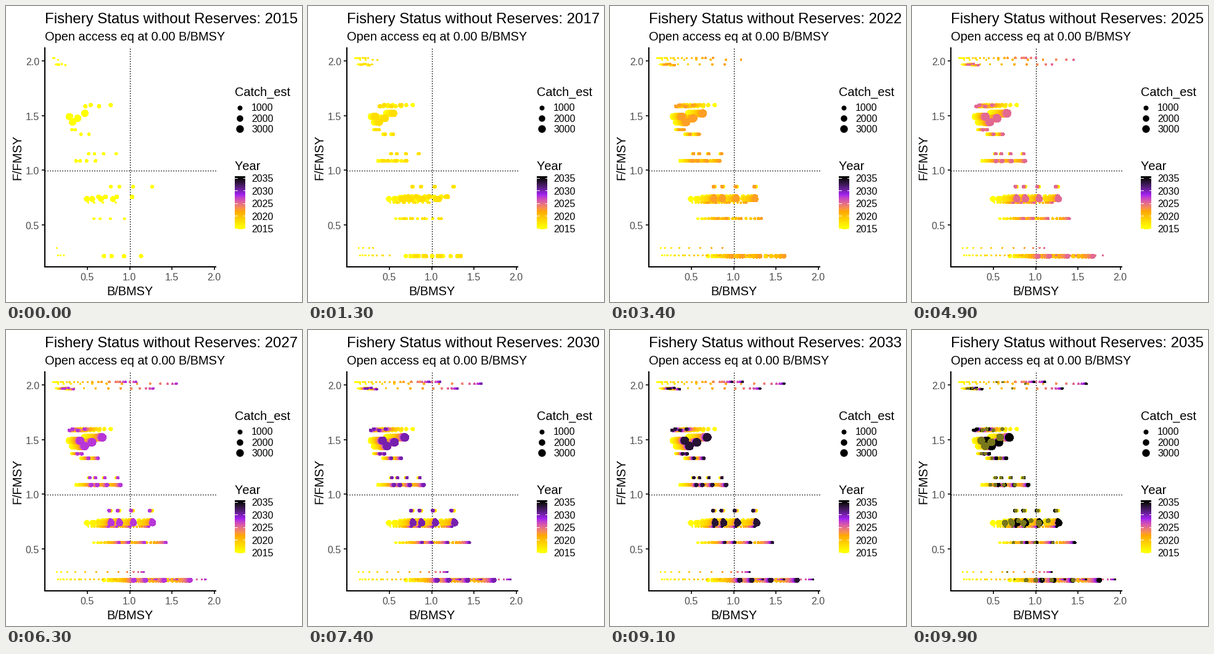
These frames come from a looping animation (480 px wide and 480 px high, 10000 ms). A matplotlib script:

```python
import matplotlib.pyplot as plt
import numpy as np
from matplotlib.animation import FuncAnimation

SIZE, DPI = 480, 72
FIRST, LAST = 2015, 2035
YEARS = np.arange(FIRST, LAST + 1)
# frames that show a halfway step: every fifth, then every fourth
STEPS = [*range(3, 84, 5), *range(87, 100, 4)]

plt.rcParams.update({"font.family": "Liberation Sans",
                     "text.kerning_factor": 6})


# ---- colour scale, blended in CIE Lab ----
RGB_XYZ = np.array([[0.4124, 0.3576, 0.1805],
                    [0.2126, 0.7152, 0.0722],
                    [0.0193, 0.1192, 0.9505]])
WHITE = RGB_XYZ.sum(axis=1)


def to_lab(rgb):
    rgb = np.asarray(rgb) / 255
    lin = np.where(rgb > 0.04045, ((rgb + 0.055) / 1.055) ** 2.4, rgb / 12.92)
    t = lin @ RGB_XYZ.T / WHITE
    f = np.where(t > 0.008856, np.cbrt(t), 7.787 * t + 16 / 116)
    x, y, z = np.moveaxis(f, -1, 0)
    return np.stack([116 * y - 16, 500 * (x - y), 200 * (y - z)], axis=-1)


def to_rgb(lab):
    light, a, b = np.moveaxis(lab, -1, 0)
    y = (light + 16) / 116
    f = np.stack([y + a / 500, y, y - b / 200], axis=-1)
    xyz = np.where(f > 0.2069, f ** 3, (f - 16 / 116) / 7.787) * WHITE
    lin = np.clip(xyz @ np.linalg.inv(RGB_XYZ).T, 0, 1)
    rgb = np.where(lin > 0.0031308, 1.055 * lin ** (1 / 2.4) - 0.055, 12.92 * lin)
    return np.clip(rgb, 0, 1)


# yellow, orange, purple, black
STOPS = to_lab([(255, 255, 0), (255, 165, 0), (160, 32, 240), (0, 0, 0)])


def year_lab(year):
    at = np.linspace(FIRST, LAST, len(STOPS))
    return np.stack([np.interp(year, at, ch) for ch in STOPS.T], axis=-1)


# ---- fish stocks: each has four runs that share one growth curve ----
RUNS = np.array([1, 1.13, 1.34, 1.63])
SHAPE = 1.5
MIN_R = 0.9

# growth rate: [(F, first B, limit of B, dot radius), ...] for the lowest run
STOCKS = {
    0.12: [((1.967, 1.967, 1.972, 1.962), 0.147, 0.24, 1.6),
           ((1.585, 1.596), 0.475, 0.258, 2.4),
           ((1.37, 1.37, 1.329, 1.329), 0.317, 0.412, 2.4),
           (0.85, 0.775, 0.75, 2.5)],
    0.25: [((1.49, 1.44, 1.475, 1.52), 0.287, 0.424, 6.4),
           (1.15, 0.515, 0.528, 2.3),
           (1.085, 0.365, 0.562, 2.9),
           (0.705, 0.51, 0.77, 1.6),
           (0.557, 0.575, 0.9, 2.1),
           (0.214, 0.695, 1.08, 3.6)],
    0.53: [((2.026, 2.026, 1.968, 2.01), 0.095, 0.98, 1.6),
           (0.757, 0.63, 0.775, 3.6),
           (0.737, 0.492, 0.78, 5.1),
           ((0.29, 0.222, 0.222, 0.222), 0.135, 1.19, 1.2)],
}


def px(b):
    return 63.5 + 137.3 * b


def py(f):
    return 443.6 - 177.3 * f


def simulate():
    """Positions and radii, indexed by year then dot."""
    t = (YEARS - FIRST)[:, None]
    pos, rad = [], []
    for rate, group in STOCKS.items():
        for f, start, limit, radius in group:
            gap = (limit / start) ** SHAPE - 1
            level = (1 + gap * np.exp(-rate * t)) ** (-1 / SHAPE)
            x = px(level * limit * RUNS)
            y = np.broadcast_to(py(np.resize(f, len(RUNS))), x.shape)
            r = MIN_R + (radius - MIN_R) * np.sqrt(level)
            pos.append(np.stack([x, y], axis=-1))
            rad.append(np.broadcast_to(r, x.shape))
    return np.hstack(pos), np.hstack(rad)


POS, RAD = simulate()
LAB = np.repeat(year_lab(YEARS)[:, None], RAD.shape[1], axis=1)


# ---- static plot ----
fig = plt.figure(figsize=(SIZE / DPI, SIZE / DPI), dpi=DPI, facecolor="white")
ax = fig.add_axes([0, 0, 1, 1])

bar = to_rgb(year_lab(np.linspace(LAST + 0.6, FIRST - 0.6, 86)))
ax.imshow(bar[:, None], extent=(371, 388, 362, 276), aspect="auto", zorder=1)
ax.set(xlim=(0, SIZE), ylim=(SIZE, 0))
ax.axis("off")


def line(x, y, color="black", lw=2, **kw):
    ax.plot(x, y, color=color, lw=lw, antialiased=False,
            solid_capstyle="butt", dash_capstyle="butt", **kw)


def text(x, y, s, size, color="black", **kw):
    kw.setdefault("va", "baseline")
    return ax.text(x, y, s, fontsize=size, color=color, **kw)


GREY, TICK = "#4d4d4d", "#333333"
DOTTED = dict(lw=1, ls=(0, (1, 2)), zorder=2)
line([200.5, 200.5], [69, 422], **DOTTED)
line([63, 341], [266.5, 266.5], **DOTTED)
for v in (0.5, 1.0, 1.5, 2.0):
    line([px(v)] * 2, [423, 428], TICK)
    line([58, 63], [py(v)] * 2, TICK)
    text(px(v) - 0.5, 445, f"{v:.1f}", 16, GREY, ha="center")
    text(54, py(v) + 7, f"{v:.1f}", 16, GREY, ha="right")
line([63, 63], [67, 423], zorder=4)
line([62, 341], [422.5, 422.5], zorder=4)

title = text(63, 28, "", 24)
text(63, 56, "Open access eq at 0.00 B/BMSY", 20)
text(201, 469, "B/BMSY", 20, ha="center")
text(28, 245, "F/FMSY", 20, rotation=90, ha="right", va="center")

text(371, 146, "Catch_est", 20)
for i in range(3):
    y = 164.5 + 17.2 * i
    r = 1 + 3 * np.sqrt(i + 1)
    ax.scatter(379, y, s=(2 * r) ** 2, color="black", lw=0, antialiased=False)
    text(398, y + 6, f"{1000 * (i + 1)}", 16)

text(371, 266, "Year", 20)
for i in range(5):
    y = 278.5 + 20.6 * i
    line([371, 374.5], [y, y], "white", 1)
    line([384.5, 388], [y, y], "white", 1)
    text(398, y + 6.5, f"{LAST - 5 * i}", 16)

dots = ax.scatter([], [], lw=0, antialiased=False, zorder=3)


def draw(n):
    k = sum(step < n for step in STEPS)
    pos, rad, lab = POS[:k + 1], RAD[:k + 1], LAB[:k + 1]
    if n in STEPS:
        nxt = (k + 1) % len(YEARS)
        pos, rad, lab = (np.concatenate([a[:k + 1], (a[k] + a[nxt])[None] / 2])
                         for a in (POS, RAD, LAB))
    dots.set_offsets(pos.reshape(-1, 2))
    dots.set_sizes((2 * rad.ravel()) ** 2)
    dots.set_facecolors(to_rgb(lab.reshape(-1, 3)))
    title.set_text(f"Fishery Status without Reserves: {FIRST + k}")
    return dots, title


anim = FuncAnimation(fig, draw, frames=100, interval=100, repeat=True,
                     repeat_delay=0, blit=False)
plt.show()
```
